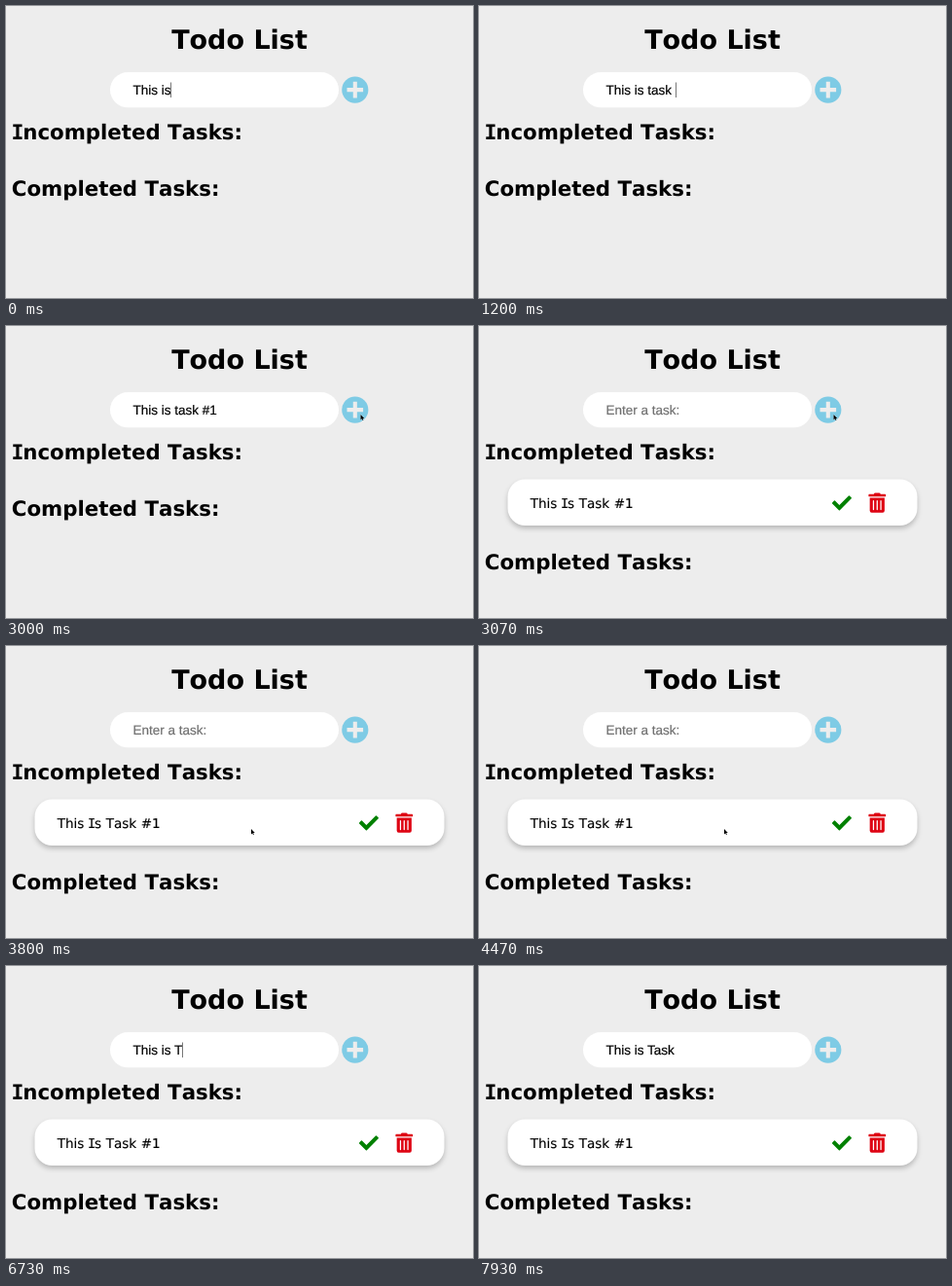
Write an HTML page that moves like this. It is 480 px wide and 300 px high and loops after 8 s.

```html
<!DOCTYPE html>
<html lang="en">
<head>
<meta charset="utf-8">
<title>Todo List</title>
<style>
  html, body { margin: 0; width: 100%; height: 100%; overflow: hidden; background: #ededed; }
  svg { display: block; }
  text { white-space: pre; text-rendering: geometricPrecision; }
  .head { font: bold 21.3px "DejaVu Sans", sans-serif; font-kerning: none; }
  .title { font-size: 27px; text-anchor: middle; }
  .item { font: 13.5px "DejaVu Sans", sans-serif; font-kerning: none; word-spacing: .034em; stroke: #000; stroke-width: .15; }
  .serif { font-family: "DejaVu Sans Mono", monospace; }
  .field { font: 13.5px "Liberation Sans", Arial, sans-serif; stroke: #000; stroke-width: .2; }
  .hint { fill: #707070; stroke: #707070; }
  .card { fill: #fff; filter: drop-shadow(0 3.2px 2.6px rgba(0, 0, 0, .22)); }
</style>
</head>
<body>
<svg width="480" height="300" viewBox="0 0 480 300">
  <text class="head title" x="240" y="44.3">Todo List</text>

  <rect x="107" y="68" width="235" height="36.3" rx="18.15" fill="#fff"/>
  <text class="field hint" id="hint" x="130.5" y="90.8">Enter a task:</text>
  <text class="field" id="typed" x="130.5" y="90.8"></text>
  <rect id="caret" y="78.5" width="1" height="15.5" fill="#777"/>

  <g transform="translate(358.8 86.1)">
    <circle r="13.6" fill="#7ecbe5"/>
    <path d="M-7.2 0H7.2M0 -7.2V7.2" stroke="#ededed" stroke-width="4.7" stroke-linecap="square" transform="scale(.87)"/>
  </g>

  <text class="head" x="5.6" y="137.4"><tspan class="serif">I</tspan><tspan dx="-1.2">ncompleted Tasks:</tspan></text>

  <g id="task">
    <rect class="card" x="29.5" y="157.5" width="421" height="47.5" rx="18"/>
    <text class="item" x="52.8" y="187">This <tspan class="serif" dx="-1.2">I</tspan><tspan dx="-1.2">s Task #1</tspan></text>
    <g transform="translate(362.8 171.6) scale(.03955)">
      <path d="M67 214L21 260 192 432 491 132 445 86 192 338Z" fill="#008000" stroke="#008000" stroke-width="36" stroke-linejoin="round"/>
    </g>
    <g transform="translate(400.4 171.5) scale(.03955)" fill="#de0413">
      <path d="M32 128H416V464Q416 512 368 512H80Q32 512 32 464Z"/>
      <path d="M16 32H136L145 13Q152 0 167 0H281Q296 0 303 13L312 32H432Q448 32 448 48V80Q448 96 432 96H16Q0 96 0 80V48Q0 32 16 32Z"/>
      <path d="M128 208V432M224 208V432M320 208V432" stroke="#fff" stroke-width="32" stroke-linecap="round"/>
    </g>
  </g>

  <text class="head" id="done" x="5.8">Completed Tasks:</text>

  <path id="arrow" d="M0 0V5.4L1.3 4.3 2 6.1 2.9 5.7 2.1 4H3.8Z" stroke="#fff" stroke-width=".4" paint-order="stroke"/>
  <path id="beam" d="M-1.5 -4H1.5M0 -4V4M-1.5 4H1.5" fill="none" stroke="#333" stroke-width=".8"/>
</svg>
<script>
  const LOOP = 8000, STEP = 1000 / 15, BLINK = 530;
  const CLICK = 3000, ADDED = 3070, FOCUS = 5000, HIDE = 5600;

  // Bursts of typing: start, text, time per key
  const first = [
    { at: 0, text: "This is", pace: 0 },
    { at: 200, text: " ", pace: 0 },
    { at: 600, text: "task", pace: 133 },
    { at: 1200, text: " ", pace: 0 },
    { at: 1670, text: "#1", pace: 260 }
  ];
  const second = [
    { at: 5470, text: "T", pace: 0 },
    { at: 5730, text: "his", pace: 100 },
    { at: 6070, text: " is ", pace: 110 },
    { at: 6730, text: "Task", pace: 133 },
    { at: 7400, text: " ", pace: 0 }
  ];

  const field = { x: 220.5, y: 86 }, button = { x: 364.5, y: 91 }, card = { x: 252, y: 188 };
  const moves = [
    { start: 2270, end: 3000, from: field, to: button },
    { start: 3130, end: 3800, from: button, to: card },
    { start: 4470, end: 5000, from: card, to: field }
  ];

  const el = id => document.getElementById(id);
  const [hint, typed, caret, task, done, arrow, beam] =
    ["hint", "typed", "caret", "task", "done", "arrow", "beam"].map(el);
  const show = (node, on) => node.setAttribute("visibility", on ? "visible" : "hidden");
  const ease = k => k * k * (3 - 2 * k);

  function typing(bursts, t) {
    let value = "", last = FOCUS;
    for (const { at, text, pace } of bursts) {
      [...text].forEach((char, i) => {
        const time = at + i * pace;
        if (time > t) return;
        value += char;
        last = time;
      });
    }
    return { value, last };
  }

  function drawField(t) {
    const { value, last } = typing(t < ADDED ? first : second, t);
    typed.textContent = value;
    show(hint, !value);

    const focused = t < CLICK || t >= FOCUS;
    show(caret, focused && (t - last) % (2 * BLINK) < BLINK);
    caret.setAttribute("x", Math.round(130.3 + (value ? typed.getComputedTextLength() : 0)));
  }

  function drawPointer(t) {
    const move = moves.filter(m => m.start < t).pop();
    const visible = move && t < HIDE;
    show(arrow, false);
    show(beam, false);
    if (!visible) return;

    const { start, end, from, to } = move;
    const k = ease(Math.min(1, (t - start) / (end - start)));
    const x = from.x + (to.x - from.x) * k;
    const y = from.y + (to.y - from.y) * k;
    const overField = x < 342 && y < 104;
    const pointer = overField ? beam : arrow;
    show(pointer, true);
    pointer.setAttribute("transform", `translate(${x} ${y})`);
  }

  function draw(t) {
    const added = t >= ADDED;
    drawField(t);
    show(task, added);
    done.setAttribute("y", added ? 249.9 : 194.5);
    drawPointer(Math.floor((t + 4) / STEP) * STEP);
  }

  const start = performance.now();
  function frame() {
    draw((performance.now() - start) % LOOP);
    requestAnimationFrame(frame);
  }
  frame();
</script>
</body>
</html>
```
